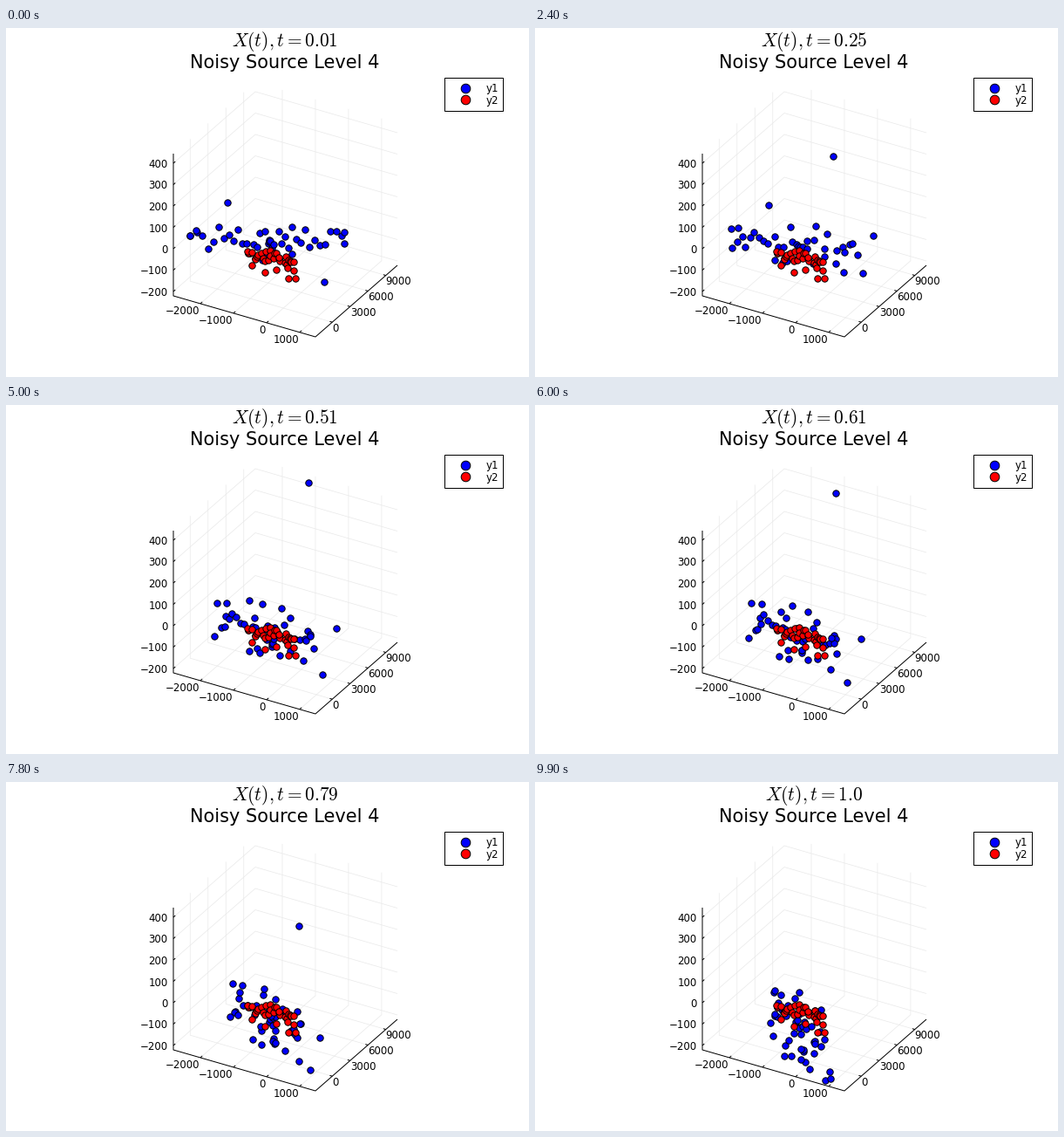
Animation, 600 px wide and 400 px high, one loop 10 s. Source, as a matplotlib script:

```python
import numpy as np
import matplotlib.pyplot as plt
from matplotlib.animation import FuncAnimation
from matplotlib.patches import Rectangle

W, H, DPI = 600, 400, 100
PX = 72 / DPI
FRAMES = 100

plt.rcParams["font.family"] = "DejaVu Sans"
plt.rcParams["mathtext.fontset"] = "cm"

fig = plt.figure(figsize=(W / DPI, H / DPI), dpi=DPI, facecolor="white")
ax = fig.add_axes([0, 0, 1, 1])
ax.set_xlim(0, W)
ax.set_ylim(H, 0)
ax.axis("off")

# Projected box: floor corners and the vertical edge
left, front, right = np.array([[192, 307], [355, 354], [449, 272]], float)
along_x, along_y = front - left, right - front
up = np.array([0, -163.0])


def line(*pts, color="black", width=1.0):
    xs, ys = zip(*pts)
    ax.plot(xs, ys, color=color, lw=width * PX, zorder=1,
            solid_capstyle="butt")


def grid(*pts):
    line(*pts, color="#e9e9e9", width=0.7)


def tick(p, direction):
    line(p, p + 3 * direction / np.hypot(*direction))


def label(x, y, text, ha="right", size=8.5, va="center_baseline"):
    return ax.text(x, y, text, ha=ha, va=va, fontsize=size, zorder=5)


def number(n):
    return str(n).replace("-", "\u2212")


def dots(pts, color, size=7.4, z=3):
    xs, ys = np.transpose(pts)
    return ax.plot(xs, ys, "o", color=color, ms=size * PX, mec="black",
                   mew=PX, zorder=z)[0]


for k, n in enumerate(range(-2000, 1001, 1000)):
    p = left + along_x * (0.19 + 0.233 * k)
    grid(p, p + along_y, p + along_y + up)
    tick(p, along_y)
    label(p[0] - 1, p[1] + 7, number(n))

for k, n in enumerate(range(0, 9001, 3000)):
    p = front + along_y * (0.205 + 0.218 * k)
    grid(p, p - along_x, p - along_x + up)
    tick(p, -along_x)
    label(p[0], p[1] + 5.5, number(n), ha="left")

for k, n in enumerate(range(-200, 401, 100)):
    p = np.array([192, 302 - 24.5 * k])
    grid(p, p + along_y, p + along_y + along_x)
    tick(p, along_y)
    label(185.5, p[1], number(n))

line(left + up, left, front, right)

label(319.5, 46.5, "Noisy Source Level 4", "center", 15, "baseline")
title = label(319.8, 21, "", "center", 15.4, "baseline")

ax.add_patch(Rectangle((502.5, 56.5), 67, 38, fc="white", ec="black", lw=PX))
for y, color, name in ((69.2, "blue", "y1"), (82.2, "red", "y2")):
    dots([(526.7, y)], color, 10.6)
    label(550.5, y + 4.3, name, "left", va="baseline")

rng = np.random.default_rng(4)

# Moving cloud: drawn in towards the centre while it arcs and falls
CENTRE = 302
side = np.linspace(-1, 1, 40)
x0 = CENTRE + 84 * side * np.abs(side) ** 0.6
y0 = 250 - 12 * np.abs(side) + rng.normal(0, 8, side.size)
drift = rng.normal(0, 7, side.size)
lift = rng.normal(4, 8, side.size)
fall = 8 + rng.exponential(22, side.size).clip(0, 55)
fall += 42 * side.clip(0)

# Outermost particles: position at the start, middle and end
outer = np.array([
    [(210, 238), (241, 226), (275, 238)],
    [(210, 238), (252, 226), (282, 243)],
    [(218, 231), (238, 264), (275, 265)],
    [(253, 200), (279, 222), (286, 313)],
    [(388, 234), (380, 255), (338, 331)],
    [(389, 245), (363, 308), (339, 339)],
    [(365, 291), (344, 270), (328, 260)],
], float)


def cloud(t):
    x = x0 + (CENTRE - x0) * 0.62 * t + drift * t
    y = y0 + fall * t - lift * np.sin(np.pi * t)
    return np.column_stack([x, y])


def arcs(t):
    weights = [(1 - 2 * t) * (1 - t), 4 * t * (1 - t), t * (2 * t - 1)]
    return np.tensordot(weights, outer, (0, 1))


def thrown(t):
    arc = max(np.sin(np.pi * t), 0)
    return [[327 - 6 * t + 23 * arc, 261 - 173 * arc ** 1.2]]


# Still cloud: a sloping band with a few stragglers below it
u = np.linspace(0, 1, 28)
band = np.column_stack([276 + 54 * u + rng.normal(0, 1, u.size),
                        258 + 8 * u + rng.normal(0, 3.5, u.size)])
stragglers = [(282, 271), (297, 279), (310, 276), (323, 274), (330, 277),
              (324, 286), (332, 286)]

blue = dots([(0, 0)], "blue")
dots(np.vstack([band, stragglers]) + [0, 0.5], "red", z=4)


def update(i):
    t = (i + 1) / FRAMES
    pts = np.vstack([cloud(t), arcs(t), thrown(t)]) + [0, 0.5]
    blue.set_data(*pts.T)
    title.set_text(f"$X(t), t = {t}$")
    return blue, title


anim = FuncAnimation(fig, update, frames=FRAMES, interval=100, repeat=True,
                     repeat_delay=0, blit=False)
plt.show()
```
